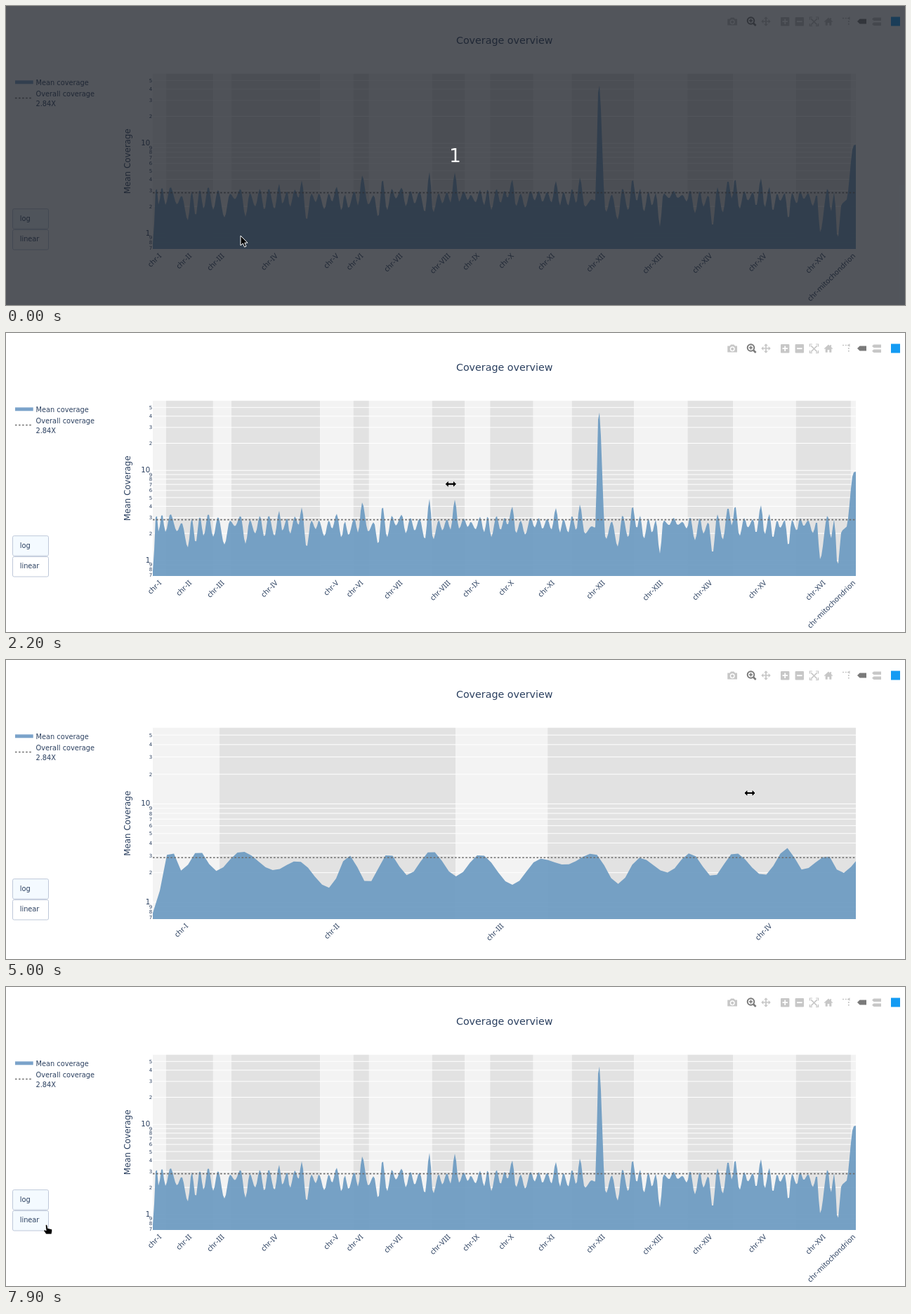
These frames come from a looping animation (1280x427 px, 8000 ms). An HTML page:

```html
<!DOCTYPE html>
<html lang="en">
<head>
<meta charset="utf-8">
<title>Coverage overview</title>
<style>
  html, body { margin: 0; width: 100%; height: 100%; overflow: hidden; background: #fff; }
  svg { display: block; width: 100%; height: 100%; }
  text { font-family: "DejaVu Sans", Verdana, sans-serif; font-size: 9.8px; fill: #2a3f5f; }
  .end { text-anchor: end; }
  .mid { text-anchor: middle; }
  .minor { font-size: 7px; }
  .major { font-size: 10.2px; }
  .chrom { font-family: "Noto Sans", Verdana, sans-serif; font-size: 10.4px; }
  .dash { stroke: #6c6c6c; stroke-width: 1.7; stroke-dasharray: 2.53; }
  .btn { fill: #fff; stroke: #bec8d9; }
  .btn.on { fill: #f4faff; }
  .off { fill: #c7c7c7; stroke: #c7c7c7; stroke-width: 0; }
  .act { fill: #7a7a7a; stroke: #7a7a7a; stroke-width: 0; }
  .line { fill: none; stroke-width: 1.7; }
  .cut { fill: none; stroke: #fff; stroke-width: 1.8; }
</style>
</head>
<body>
<svg viewBox="0 0 1280 427" preserveAspectRatio="none">
  <defs><clipPath id="clip"><rect id="clipBox" x="209" y="96.5" width="1001"/></clipPath></defs>
  <rect width="1280" height="427" fill="#fff"/>
  <text x="709.7" y="53.7" class="mid" style="font-size:14.27px">Coverage overview</text>

  <rect x="13" y="106.3" width="25.7" height="5" fill="#7ba3ca"/>
  <path d="M13 131.5H38" class="dash"/>
  <text x="42.5" y="112.6">Mean coverage</text>
  <text x="42.5" y="129">Overall coverage</text>
  <text x="42.5" y="142.5">2.84X</text>

  <g id="chart"></g>
  <g id="drag">
    <rect id="dimA" x="209" y="96.5" height="250.5" fill-opacity=".4"/>
    <rect id="dimB" x="408.4" y="96.5" width="801.6" height="250.5" fill-opacity=".4"/>
    <g fill="#fff" stroke="#444">
      <rect id="grip" y="163" width="3" height="35"/>
      <rect x="408.7" y="163" width="3" height="35"/>
    </g>
  </g>
  <g id="hover">
    <path d="M0 0L6 -5V-9.8H54.5V9.8H6V5Z" fill="#7ba3c8" stroke="#444"/>
    <text id="value" x="9" y="4" style="font-size:9.55px;fill:#444"></text>
  </g>

  <g id="buttons">
    <rect x="9.5" y="-57.3" width="51" height="28.5" rx="2" class="btn on"/>
    <rect id="linear" x="9.5" y="-27.5" width="51" height="28.5" rx="2" class="btn"/>
    <text x="19.7" y="-40.4">log</text>
    <text x="19.7" y="-10.7">linear</text>
  </g>

  <g id="bar">
    <g class="off">
      <path d="M1027.3 18.5H1030.5L1032 16.5H1036.5L1038 18.5H1041V27.5H1027.3Z"/>
      <circle cx="1034.2" cy="22.8" r="2.8" class="cut" style="stroke-width:1.4"/>
    </g>
    <g class="act">
      <circle cx="1060.5" cy="21" r="4.8" class="line" style="stroke-width:2"/>
      <path d="M1064 24.5L1067.6 28" class="line" style="stroke-width:2.6"/>
      <path d="M1058 21H1063M1060.5 18.5V23.5" class="line"/>
    </g>
    <g class="off">
      <path d="M1076.5 22H1087.5M1082 16.5V27.5" class="line"/>
      <path d="M1075.3 22l3-3v6zM1088.7 22l-3-3v6zM1082 15.3l-3 3h6zM1082 28.7l-3-3h6z"/>
      <rect x="1103" y="16" width="12.4" height="12.4" rx="1"/>
      <path d="M1105.5 22.2H1113M1109.2 18.5V26" class="cut"/>
      <rect x="1123.6" y="16" width="12.4" height="12.4" rx="1"/>
      <path d="M1126 22.2H1133.6" class="cut"/>
      <path d="M1146 18L1155 27M1155 18L1146 27" class="line"/>
      <path d="M1144.4 19.5V16H1148M1153 16H1156.6V19.5M1156.6 25V28.4H1153M1148 28.4H1144.4V25" class="line" style="stroke-width:1.2"/>
    </g>
    <path id="home" d="M1164.8 22.3L1171 16.6L1173.3 18.7V17H1175V20.3L1177.2 22.3L1176.4 23.1L1175.3 22.2V27.7H1172.3V24H1169.7V27.7H1166.7V22.2L1165.6 23.1Z"/>
    <g class="off">
      <path d="M1191 17.5H1198M1199.8 21V28" class="line" stroke-dasharray="2 1.8"/>
      <path d="M1197.5 17.5l4 -2.2v4.4z"/>
      <path d="M1233 18.7L1235.5 16.5H1246V21H1235.5ZM1233 25.7L1235.5 23.4H1246V28H1235.5Z"/>
    </g>
    <path class="act" d="M1212 22L1215.5 18.5H1225V25.6H1215.5Z"/>
    <rect x="1260" y="15.5" width="13" height="13" fill="#139bf3"/>
  </g>
  <g id="tip">
    <path d="M1166 36.3L1171 31L1176 36.3Z" fill="#69728b"/>
    <rect x="1115" y="36" width="71" height="23.5" rx="2" fill="#69728b"/>
    <text x="1150.4" y="51.2" class="mid" style="fill:#fff;font-size:9.75px">Reset axes</text>
  </g>

  <g id="count">
    <rect width="1280" height="427" fill="#1c2028" fill-opacity=".76"/>
    <text x="639.5" y="222.5" class="mid" style="fill:#fff;font-size:26px">1</text>
  </g>

  <g id="cursor" stroke="#fff" stroke-linejoin="round">
    <path id="arrow" d="M0 0V14L3.3 11L5.6 16.2L8 15.1L5.8 10.2H10Z"/>
    <path id="resize" d="M-8 0L-3.2 -5V-1.6H3.2V-5L8 0L3.2 5V1.6H-3.2V5Z" stroke-width=".8"/>
    <path id="hand" d="M-1.3 .8Q0 -.8 1.3 .8L2 5L7.2 6.2Q8.5 6.8 8.2 9L7.4 13.5H-.4L-3.6 9Q-4 7 -2 7.4L-.4 8.4Z" stroke-width=".8"/>
  </g>
</svg>
<script>
const $ = id => document.getElementById(id);
const LEFT = 209, TOP = 96.5, WIDTH = 1001, RIGHT = LEFT + WIDTH, LOOP = 8000;
const FULL = { scale: 1, height: 250.5 };
const ZOOM = { scale: 5.02, height: 273.5 };
const LOG_MIN = -0.171, LOG_MAX = 1.775;

// chromosome lengths in kilobases
const names = 'I II III IV V VI VII VIII IX X XI XII XIII XIV XV XVI mitochondrion'.split(' ');
const lengths = [230, 813, 317, 1532, 577, 270, 1091, 563, 440, 746, 667, 1078, 924, 784, 1091, 948, 86];
const genome = lengths.reduce((a, b) => a + b);

// most prominent peaks and dips (x, y); the ripples between them are random
const landmarks = [
  [209, 339], [214, 255], [222, 258], [227, 284], [250, 271], [259, 306], [270, 300], [288, 258], [295, 291],
  [311, 302], [334, 261], [341, 301], [389, 254], [421, 249], [428, 306], [507, 242], [530, 302], [536, 247],
  [603, 237], [639, 238], [721, 248], [783, 250], [817, 245], [834, 276], [844, 109], [854, 295], [871, 305],
  [892, 247], [931, 315], [1006, 315], [1028, 249], [1038, 246], [1075, 246], [1114, 305], [1159, 323],
  [1170, 260], [1184, 333], [1190, 282], [1196, 278], [1207, 199], [1210, 198]
];
const RIPPLE = 6.2, STEP = 2;

let seed = 11;
const random = () => (seed = seed * 16807 % 2147483647) / 2147483647;
const isPeak = y => y < 277;

// turning points alternate between peak and dip from one landmark to the next
function turningPoints() {
  const points = [landmarks[0]];
  for (let i = 1; i < landmarks.length; i++) {
    const [xa, ya] = landmarks[i - 1], [xb, yb] = landmarks[i], gap = xb - xa;
    const count = isPeak(ya) === isPeak(yb)
      ? 2 * Math.round(gap / RIPPLE / 2) - 1
      : 2 * Math.round((gap / RIPPLE - 1) / 2);
    let peak = isPeak(ya);
    for (let n = 1; n <= count; n++) {
      peak = !peak;
      const x = xa + gap * (n + (random() - 0.5) * 0.4) / (count + 1);
      points.push([x, peak ? 258 + random() * 12 : 274 + random() * 22]);
    }
    points.push(landmarks[i]);
  }
  return points;
}

// evenly spaced samples of the curve, in fractions of the full plot
function sampleCurve() {
  const points = turningPoints(), samples = [];
  for (let x = LEFT, i = 0; x <= RIGHT; x += STEP) {
    while (i < points.length - 2 && points[i + 1][0] < x) i++;
    const [xa, ya] = points[i], [xb, yb] = points[i + 1];
    const k = (1 - Math.cos(Math.PI * Math.min(1, (x - xa) / (xb - xa)))) / 2;
    samples.push([(x - LEFT) / WIDTH, (ya + (yb - ya) * k - TOP) / FULL.height]);
  }
  samples.push([1, samples[samples.length - 1][1]]);
  return samples;
}
const series = sampleCurve();

function drawChart({ scale, height }) {
  const bottom = TOP + height;
  const px = u => LEFT + u * WIDTH * scale;
  const py = value => bottom - (Math.log10(value) - LOG_MIN) / (LOG_MAX - LOG_MIN) * height;
  let bands = '', labels = '', grid = '', ticks = '', start = 0;

  names.forEach((name, i) => {
    const a = px(start / genome), b = px((start += lengths[i]) / genome);
    const x = (a + b) / 2 + 3.5, y = bottom + 10.5;
    if (a >= RIGHT) return;
    bands += `<rect x="${a}" y="${TOP}" width="${b - a}" height="${height}" fill="${i % 2 ? '#e2e2e2' : '#f3f3f3'}"/>`;
    if (x < RIGHT + 4) labels += `<text x="${x}" y="${y}" class="end chrom" transform="rotate(-45 ${x} ${y})">chr-${name}</text>`;
  });
  for (const power of [0.1, 1, 10]) {
    for (let n = 1; n < 10; n++) {
      const value = n * power, y = py(value);
      if (y < TOP || y > bottom) continue;
      grid += `M${LEFT} ${y}h${WIDTH}`;
      ticks += n === 1
        ? `<text x="205.3" y="${y + 2.7}" class="end major">${value}</text>`
        : `<text x="208.3" y="${y + 2.6}" class="end minor">${n}</text>`;
    }
  }
  const outline = series.map(([u, v]) => `L${px(u).toFixed(1)} ${(TOP + v * height).toFixed(1)}`).join('');
  $('clipBox').setAttribute('height', height);
  $('chart').innerHTML = `<g clip-path="url(#clip)">${bands}
    <path d="${grid}" stroke="#fff"/>
    <path d="M${LEFT} ${bottom}${outline}V${bottom}Z" fill="#6d9bc2" fill-opacity=".93"/>
    <path d="M${LEFT} ${py(2.84)}h${WIDTH}" class="dash"/></g>${ticks}${labels}
    <text class="mid" style="font-size:11.87px" transform="translate(177.3 ${TOP + height / 2}) rotate(-90)">Mean Coverage</text>`;
  $('buttons').setAttribute('transform', `translate(0 ${bottom})`);
}

// pointer stops: time, x, y
const stops = [
  [0, 334, 328], [200, 334, 328], [1000, 472, 284], [1100, 477, 280], [1700, 375, 232], [1900, 404, 226],
  [2400, 649, 215], [2500, 649, 215], [3100, 424, 192], [3200, 424, 192], [4100, 189, 191], [4800, 532, 278],
  [4900, 532, 278], [5000, 1059, 190], [5800, 1174, 52], [6100, 1183, 22], [6900, 1183, 22], [7700, 28, 400],
  [7900, 57.5, 339.5]
];
const clamp = v => Math.max(0, Math.min(1, v));
const easeOut = k => 1 - (1 - k) ** 3;
const show = (id, on) => { $(id).style.display = on ? '' : 'none'; };

function pointer(t) {
  const i = stops.findIndex(stop => stop[0] > t);
  if (i < 0) return stops[stops.length - 1].slice(1);
  const [t0, x0, y0] = stops[i - 1], [t1, x1, y1] = stops[i];
  const k = easeOut((t - t0) / (t1 - t0));
  return [x0 + (x1 - x0) * k, y0 + (y1 - y0) * k];
}

let view;
function render(time) {
  const t = Math.floor(time % LOOP / 100) * 100; // ten steps a second
  const next = t >= 4200 && t < 6600 ? ZOOM : FULL;
  if (next !== view) drawChart(view = next);

  const [x, y] = pointer(t);
  const dragging = t >= 3300 && t < 4200;
  const inPlot = x > LEFT && x < RIGHT && y > TOP && y < TOP + view.height;
  const onHome = t >= 5900 && t < 7000;
  const onLinear = t >= 7800;
  const kind = t < 200 ? 'arrow' : dragging || inPlot ? 'resize' : onHome || onLinear ? 'hand' : 'arrow';
  for (const id of ['arrow', 'resize', 'hand']) show(id, id === kind);
  $('cursor').setAttribute('transform', `translate(${x} ${y})`);

  show('count', t < 200);
  show('drag', dragging);
  if (dragging) {
    const start = Math.max(LEFT, x - 4);
    $('dimA').setAttribute('width', start - LEFT);
    $('grip').setAttribute('x', start - 3.2);
  }

  const second = t === 1100;
  show('hover', t === 1000 || second);
  $('hover').setAttribute('transform', second ? 'translate(477 281)' : 'translate(469 279)');
  $('value').textContent = second ? '2.185417' : '2.276653';

  $('bar').setAttribute('opacity', t < 4200 ? clamp(1 - (t - 3200) / 215) : clamp((t - 4100) / 300));
  $('home').setAttribute('class', onHome ? 'act' : 'off');
  show('tip', onHome);
  $('linear').setAttribute('class', onLinear ? 'btn on' : 'btn');
}

const begin = performance.now();
function tick() {
  render(performance.now() - begin);
  requestAnimationFrame(tick);
}
tick();
</script>
</body>
</html>
```
